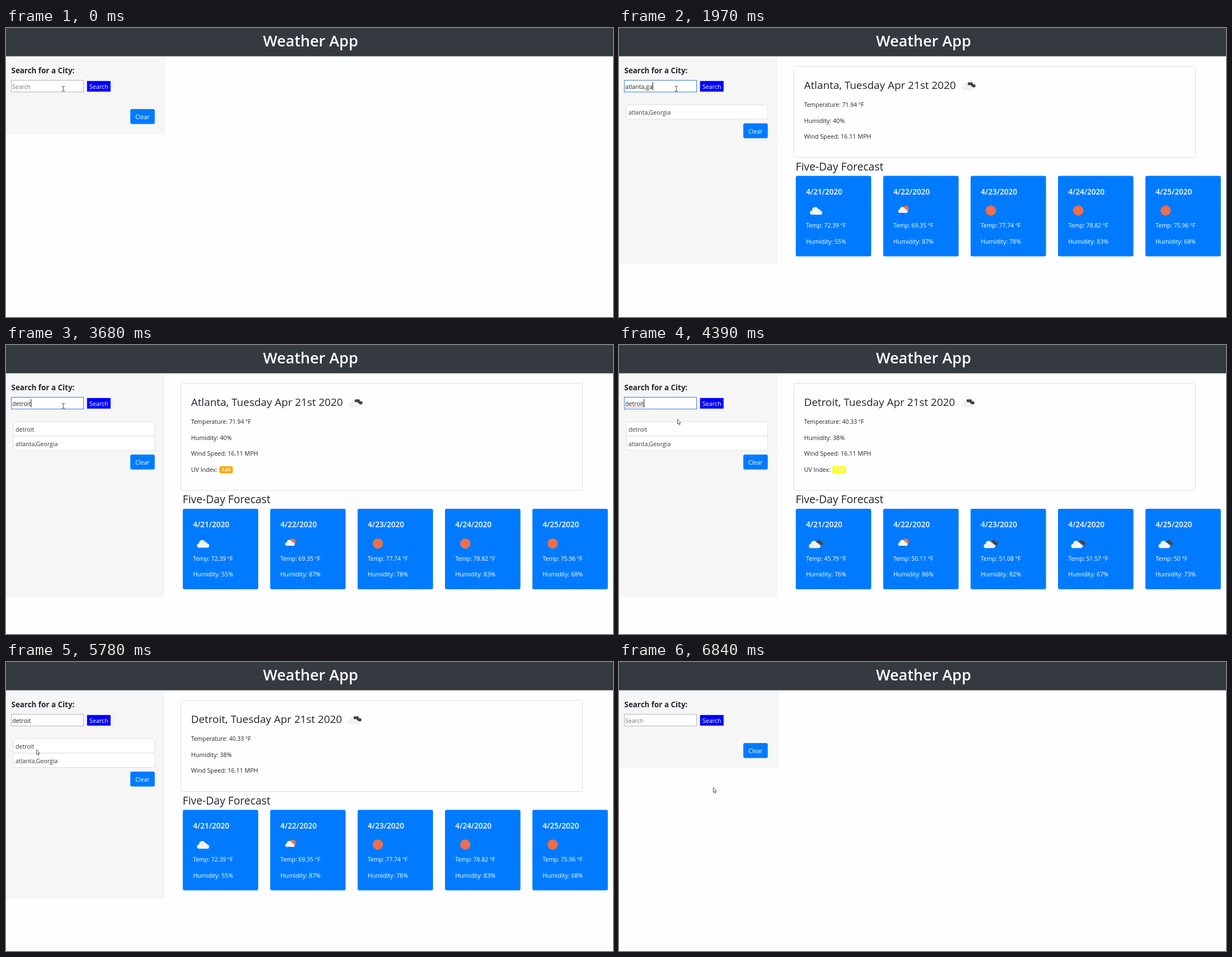
These frames come from a looping animation (1084 by 517 pixels, 7.07 s). An HTML page:

```html
<!DOCTYPE html>
<html lang="en">
<head>
<meta charset="utf-8">
<title>Weather App</title>
<style>
html, body { margin: 0; width: 100%; height: 100%; overflow: hidden; background: #fefefe; }
svg { display: block; width: 1084px; height: 517px; font-family: 'Open Sans', 'Noto Sans', sans-serif; }
</style>
</head>
<body>
<svg id="stage" viewBox="0 0 1084 517"></svg>
<script>
const LOOP = 7070, ROW = 25.5, INK = '#212529', BLUE = '#007bff';
const stage = document.getElementById('stage');

const cities = {
  atlanta: {
    name: 'Atlanta', temp: '71.94', hum: 40, uv: '7.63', uvFill: '#ffa500', iconX: 625, dark: '#4a4139',
    days: [['cloud', '72.39', 55], ['rain', '69.35', 87], ['sun', '77.74', 78], ['sun', '78.82', 83], ['sun', '75.96', 68]]
  },
  detroit: {
    name: 'Detroit', temp: '40.33', hum: 38, uv: '5.56', uvFill: '#ffff00', iconX: 623, dark: '#483f41',
    days: [['broken', '45.79', 76], ['rain', '50.11', 86], ['broken', '51.08', 82], ['broken', '51.57', 67], ['broken', '50', 73]]
  }
};

const aList = ['atlanta', 'atlanta, ga', 'atlanta,ga', 'Atlanta, GA', 'atlanta,Georgia', 'austin'];
const dList = ['detroit', 'denver', 'dallas'];
const aShort = ['atlanta,ga', 'atlanta,Georgia'];

// Each step overrides part of the page state from its time on.
const steps = [
  [0, { text: '', focus: false, caret: true, sel: false, wavy: false, menu: [], rows: 0,
        list: [], now: null, week: null, uv: false, hover: false }],
  [80, { focus: true, menu: aList, rows: 6 }],
  [160, { text: 'a' }],
  [230, { rows: 5, menu: aList.slice(0, 5) }],
  [400, { text: 'at' }],
  [550, { text: 'atl' }],
  [620, { text: 'atla' }],
  [770, { text: 'atlan' }],
  [940, { text: 'atlant' }],
  [1040, { text: 'atlanta' }],
  [1260, { text: 'atlanta,', rows: 4 }],
  [1340, { menu: aList.slice(1, 5) }],
  [1410, { text: 'atlanta,g', menu: aShort, rows: 2 }],
  [1600, { text: 'atlanta,ga', rows: 1 }],
  [1650, { rows: 0, list: ['atlanta,Georgia'] }],
  [1820, { now: 'atlanta' }],
  [1900, { week: 'atlanta' }],
  [2130, { uv: true }],
  [2200, { caret: false }],
  [2370, { sel: true }],
  [2430, { sel: false, text: '', caret: true }],
  [2660, { text: 'd', menu: dList, rows: 3 }],
  [2810, { text: 'de' }],
  [2900, { rows: 2 }],
  [3050, { text: 'det' }],
  [3130, { text: 'detr', rows: 1 }],
  [3200, { text: 'detro' }],
  [3370, { text: 'detroi' }],
  [3450, { text: 'detroit', rows: 0 }],
  [3680, { list: ['detroit', 'atlanta,Georgia'] }],
  [3760, { now: 'detroit', uv: false }],
  [3830, { week: 'detroit' }],
  [4060, { uv: true }],
  [4210, { wavy: true }],
  [4760, { focus: false, wavy: false }],
  [4840, { now: 'atlanta' }],
  [4910, { week: 'atlanta' }],
  [5700, { now: 'detroit', uv: false }],
  [5850, { week: 'detroit' }],
  [5930, { uv: true }],
  [6380, { hover: true }],
  [6610, { text: '', list: [], now: null, week: null, uv: false, hover: false }]
];

// Pointer: time, x, y
const pointer = [
  [4290, 103, 120], [4390, 104, 132], [4450, 84, 152], [4530, 64, 170],
  [5140, 62, 167], [5220, 59, 163], [5300, 56, 160], [5380, 54, 156],
  [5610, 46, 160], [5700, 54, 156],
  [6000, 68, 163], [6080, 100, 175], [6150, 140, 187], [6220, 180, 198], [6290, 214, 205],
  [6380, 236, 209], [6460, 242, 210], [6690, 222, 215], [6760, 188, 221], [6840, 168, 224]
];

function text(x, y, s, { size = 10.65, fill = INK, weight = 400, extra = '' } = {}) {
  return `<text x="${x}" y="${y}" font-size="${size}" font-weight="${weight}" fill="${fill}" ${extra}>${s}</text>`;
}
function rect(x, y, w, h, fill, extra = '') {
  return `<rect x="${x}" y="${y}" width="${w}" height="${h}" fill="${fill}" ${extra}/>`;
}
function circle(x, y, r, fill) {
  return `<circle cx="${x}" cy="${y}" r="${r}" fill="${fill}"/>`;
}

function cloud(x, y, k, fill) {
  const puffs = circle(-7, 3.2, 3.8, fill) + circle(-1.5, -1.2, 5.6, fill) +
    circle(3.8, 0.8, 3.8, fill) + circle(7.3, 3.4, 3.6, fill) + rect(-7, 1.5, 14.3, 5.5, fill);
  return `<g transform="translate(${x} ${y}) scale(${k})">${puffs}</g>`;
}
const icons = {
  cloud: (x, y) => cloud(x, y + 0.4, 1, '#f2f2f2'),
  sun: (x, y) => circle(x, y, 9.2, '#ec6e4c'),
  broken: (x, y) => cloud(x + 6.3, y - 2, 0.62, '#484848') + cloud(x - 2.5, y + 1.5, 0.95, '#f2f2f2'),
  rain: (x, y) => circle(x + 4.2, y - 3.6, 5.3, '#ec6e4c') + cloud(x - 1, y - 1.3, 0.78, '#f2f2f2') +
    `<path d="M${x - 4} ${y + 4}l1.5 2.5m1-2l1.8 3.4m1.2-3.6l1 2" stroke="#484848" stroke-width=".9" fill="none"/>`
};
// The large icon sits on a light card, so its dark part lies in front.
function bigIcon(x, y, dark) {
  return cloud(x - 2, y + 1.5, 0.98, '#f2f0f0') + circle(x + 0.3, y - 3.3, 2.6, dark) +
    circle(x + 4.2, y - 3.2, 2.8, dark) + circle(x + 8.8, y + 0.4, 2.9, dark) + circle(x + 5.8, y - 0.6, 2.4, dark);
}

function sidebar(s) {
  const n = s.list.length, shift = s.uv ? 28.5 : 0;
  const content = s.week ? 423 + shift : s.now ? 246 : 0;
  let out = rect(0, 50, s.week ? 283 : 284, Math.max(189.5 + ROW * n, content) - 50, '#f6f6f6');
  out += text(9.5, 81, 'Search for a City:', { size: 13.4, weight: 700 });
  out += rect(9.5, 93.5, 129, 21, '#fff', `stroke="${s.focus ? '#3b7ddd' : '#b4b4b4'}"`);
  if (s.sel) out += rect(11, 97, 49, 14.5, '#3390ff');
  out += s.text
    ? text(11, 109, s.text, { fill: s.sel ? '#fff' : INK, extra: 'id="typed"' })
    : text(11, 109, 'Search', { size: 10.5, fill: '#757575' });
  if (s.wavy) out += '<path d="M11 111.6' + 'l1.4-1.1 1.4 1.1'.repeat(12) + '" fill="none" stroke="#e33" stroke-width=".6"/>';
  out += rect(144.7, 94.8, 42.1, 19, '#0000ff') + text(149, 109, 'Search', { size: 10.65, weight: 500, fill: '#fff' });
  s.list.forEach((name, i) => {
    const y = 137.5 + ROW * i;
    out += rect(13, y, 252.7, ROW, '#fff', 'rx="3" stroke="#dfdfdf"') +
      text(17, y + 17.5, name, { fill: '#343a40' });
  });
  const top = 145 + ROW * n;
  out += rect(222, top, 43.7, 26.7, s.hover ? '#0069d9' : BLUE, 'rx="3"') +
    text(231, top + 18, 'Clear', { size: 10.5, weight: 500, fill: '#fff' });
  return out;
}

function current(s) {
  const c = cities[s.now];
  let out = rect(312, 68.5, 717.5, s.uv ? 191.5 : 163, '#fefefe', 'rx="3" stroke="#e0e0e0"');
  out += text(330.5, 109.2, `${c.name}, Tuesday Apr 21st 2020`, { size: 18.9, weight: 500 });
  out += bigIcon(c.iconX, 103, c.dark);
  out += text(330.5, 141, `Temperature: ${c.temp} °F`, { size: 10.4 });
  out += text(330.5, 169.5, `Humidity: ${c.hum}%`, { size: 10.75 });
  out += text(330.5, 198, 'Wind Speed: 16.11 MPH', { size: 10.75 });
  if (s.uv) {
    out += text(330.5, 226.5, 'UV Index:', { size: 10.7 });
    out += rect(381, 217, 24, 12.5, c.uvFill, 'rx="3"');
    out += text(385, 226.3, c.uv, { size: 8, weight: 700, fill: '#fff' });
  }
  return out;
}

function forecast(s) {
  let out = text(315.5, 254.8, 'Five-Day Forecast', { size: 19.3, weight: 500 });
  cities[s.week].days.forEach(([icon, temp, hum], i) => {
    const x = 315.7 + 156.1 * i, fill = '#fff';
    out += rect(x, 264.6, 134.7, 143.9, BLUE, 'rx="3"');
    out += text(x + 18.2, 297.8, `4/${21 + i}/2020`, { size: 13.6, weight: 600, fill });
    out += icons[icon](x + 36.2, 326.6);
    out += text(x + 18.2, 357.3, `Temp: ${temp} °F`, { size: 10.4, weight: 500, fill });
    out += text(x + 18.2, 385.8, `Humidity: ${hum}%`, { size: 10.65, weight: 500, fill });
  });
  return `<g transform="translate(0 ${s.uv ? 28.5 : 0})">${out}</g>`;
}

function menu(s) {
  const h = 16 + ROW * s.rows;
  const items = s.menu.map((m, i) => text(17.5, 136.7 + ROW * i, m, { size: 8.2, weight: 600 })).join('');
  return `<clipPath id="fold">${rect(8, 115, 140, h + 2, '#000')}</clipPath>` +
    `<g clip-path="url(#fold)">${rect(9, 115.5, 137, h + 1.5, '#fff')}` +
    `<path d="M9 117V${117 + h}M146 117V${117 + h}" stroke="#cfcfcf"/>${items}</g>`;
}

function cursor(t) {
  const at = pointer.filter(p => p[0] <= t).pop();
  if (!at) {
    return '<path d="M99.5 104.5h2l.8.7.8-.7h2M102.3 105v7.5M99.5 113h2l.8-.7.8.7h2" fill="none" stroke="#333" stroke-width=".9"/>';
  }
  return `<path transform="translate(${at[1]} ${at[2]})" d="M.4.5V9.4L2.4 7.5 3.8 10.8 5.1 10.2 3.7 7.1H6.4z" fill="#fff" stroke="#333" stroke-width=".8"/>`;
}

function draw(t) {
  const s = Object.assign({}, ...steps.filter(p => p[0] <= t).map(p => p[1]));
  let out = rect(0, 0, 1084, 517, '#fefefe') + sidebar(s) + rect(0, 0, 1084, 50.6, '#343a40');
  out += text(543.9, 33, 'Weather App', { size: 27, weight: 600, fill: '#fff', extra: 'text-anchor="middle"' });
  if (s.now) out += current(s);
  if (s.week) out += forecast(s);
  if (s.rows) out += menu(s);
  out += '<path id="caret" stroke="#111" stroke-width="1"/>' + cursor(t);
  stage.innerHTML = out;
  if (s.focus && s.caret && !s.sel) {
    const typed = document.getElementById('typed');
    const x = 11.5 + (typed ? typed.getComputedTextLength() : 0);
    document.getElementById('caret').setAttribute('d', `M${x} 97V111.5`);
  }
}

const marks = [...steps, ...pointer].map(p => p[0]);
let shown = -1;
function tick() {
  const t = performance.now() % LOOP;
  const mark = Math.max(...marks.filter(m => m <= t));
  if (mark !== shown) draw(shown = mark);
  requestAnimationFrame(tick);
}
tick();
</script>
</body>
</html>
```
